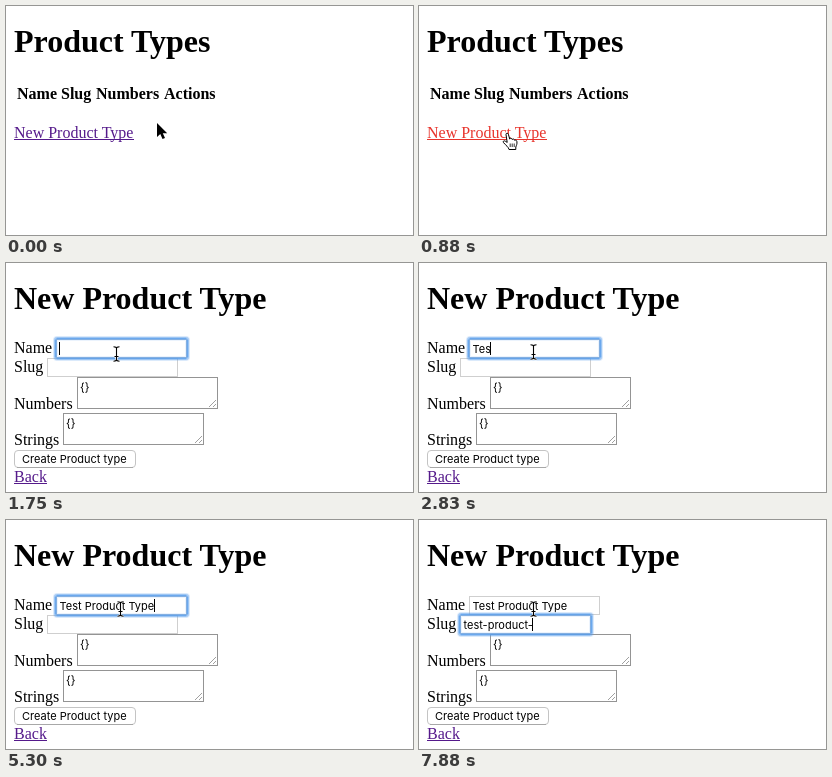
An HTML page for the animation above (8000 ms loop, 407 by 229 pixels).

```html
<!DOCTYPE html>
<html lang="en">
<head>
<meta charset="utf-8">
<title>New Product Type</title>
<style>
  html, body { margin: 0; width: 100%; height: 100%; overflow: hidden; background: #fff; }
  svg { display: block; width: 407px; height: 229px; }
  text { font: 16px "Liberation Serif", "Times New Roman", serif; white-space: pre; }
  .title { font-size: 32px; font-weight: 700; }
  .head { font-weight: 700; }
  .ui { font: 11px Inter, sans-serif; }
  .link { fill: #551a8b; }
  .link.active { fill: #e8342c; }
  .edge { fill: #fff; stroke: #cfcfcf; }
  .area { fill: #fff; stroke: #949494; }
  .ring rect { fill: none; stroke: #5b9fec; }
</style>
</head>
<body>
<svg viewBox="0 0 407 229" xmlns="http://www.w3.org/2000/svg">
  <rect width="407" height="229" fill="#fff"/>

  <g id="listPage">
    <text class="title" x="8" y="46">Product Types</text>
    <text class="head" x="11" y="93">Name</text>
    <text class="head" x="55" y="93">Slug</text>
    <text class="head" x="90" y="93">Numbers</text>
    <text class="head" x="158" y="93">Actions</text>
    <g class="link" id="newLink">
      <text x="8" y="132">New Product Type</text>
      <rect x="8" y="133" width="120" height="1"/>
    </g>
  </g>

  <g id="formPage">
    <text class="title" x="8" y="46">New Product Type</text>
    <text x="8" y="90">Name</text>
    <text x="8" y="109">Slug</text>
    <text x="8" y="146">Numbers</text>
    <text x="8" y="182">Strings</text>
    <rect class="edge" x="50.5" y="76.5" width="130" height="18"/>
    <rect class="edge" x="41.5" y="95.5" width="130" height="18"/>
    <g id="areas"></g>
    <rect x="8.5" y="187.5" width="121" height="17" rx="3.5" fill="#fff" stroke="#c4c4c4"/>
    <path d="M11 204.5H127" stroke="#a8a8a8"/>
    <text class="ui" x="16" y="200">Create Product type</text>
    <g class="link">
      <text x="8" y="219">Back</text>
      <rect x="8" y="220" width="33" height="1"/>
    </g>
    <g class="ring" id="ring"></g>
    <text class="ui" id="nameText" x="53.5" y="90"></text>
    <text class="ui" id="slugText" x="44.5" y="109"></text>
    <rect id="caret" width="1" height="13"/>
  </g>

  <g id="cursor">
    <path id="arrow" d="M0 0V14L3.3 11 5.5 16 8 15 5.8 10.2H10.2Z" stroke="#fff" stroke-width="1.2" paint-order="stroke"/>
    <g id="hand" stroke="#000" stroke-linejoin="round">
      <path fill="#fff" d="M-1 1.5C-1-.2 1-.2 1.4 1.3L2.7 6C3.2 5 5 5 5.2 6.5 6 5.6 7.4 6 7.6 7.3 8.6 6.7 9.8 7.3 9.9 8.6 10.2 11 9.6 12 8.8 14V16.5H2C1.6 14-1 12.6-3.5 9.6-4.4 8.3-3 7.2-1.7 8.2L.2 9.4Z"/>
      <path fill="none" stroke-width=".8" d="M3.2 10.5V14M5.2 10.5V14M7.2 10.5V14"/>
    </g>
    <g id="beam" fill="none">
      <path stroke="#fff" stroke-width="2.4" d="M-3-7.2Q0-7.2 0-5.5V5.5Q0 7.2-3 7.2M3-7.2Q0-7.2 0-5.5V5.5Q0 7.2 3 7.2M-2 2.5H2"/>
      <path stroke="#000" stroke-width="1.1" d="M-3-7.2Q0-7.2 0-5.5V5.5Q0 7.2-3 7.2M3-7.2Q0-7.2 0-5.5V5.5Q0 7.2 3 7.2M-2 2.5H2"/>
    </g>
  </g>
</svg>
<script>
const LOOP = 8000;
const PAGE_AT = 1060, NAME_AT = 1670, SLUG_AT = 5660;
const $ = id => document.getElementById(id);
const show = (id, on) => $(id).setAttribute("display", on ? "inline" : "none");

const name = {
  text: "Test Product Type", x: 53, y: 79, box: [50, 76],
  // [time, characters typed]
  keys: [[2650, 1], [2830, 3], [2910, 4], [3360, 5], [3630, 6], [3720, 7], [3800, 8], [3890, 9],
    [4060, 11], [4240, 12], [4600, 13], [4860, 14], [4950, 15], [5210, 16], [5300, 17]]
};
const slug = {
  text: "test-product-", x: 44, y: 98, box: [41, 95],
  keys: [[6110, 1], [6200, 2], [6290, 3], [6370, 4], [6460, 5], [6730, 6], [6820, 7], [6900, 8],
    [7350, 9], [7440, 10], [7520, 11], [7700, 12], [7880, 13]]
};

const pen = document.createElement("canvas").getContext("2d");
pen.font = "11px Inter, sans-serif";

$("areas").innerHTML = [[71, 114], [57, 150]].map(([x, y]) => `
  <rect class="area" x="${x + .5}" y="${y + .5}" width="140" height="31"/>
  <text class="ui" x="${x + 3}" y="${y + 14}">{}</text>
  <path d="M${x + 132} ${y + 30}l7-7M${x + 136} ${y + 30}l3-3" stroke="#888" stroke-width=".8"/>`).join("");

// Soft focus glow, faintest on the outside
$("ring").innerHTML = [[2.5, .22], [1.5, .6], [.5, .9], [-.5, .65], [-1.5, .12]].map(([d, alpha]) =>
  `<rect x="${-d}" y="${-d}" width="${131 + 2 * d}" height="${19 + 2 * d}" rx="${Math.max(0, d + .5)}" opacity="${alpha}"/>`).join("");

const typed = (field, t) => {
  const key = field.keys.filter(([time]) => time <= t).pop();
  return field.text.slice(0, key ? key[1] : 0);
};

function glide(t, start, steps, from, to) {
  const step = Math.floor((t - start + 4) / 88.3) + 1;
  const p = Math.min(1, Math.max(0, step / steps));
  const eased = p * p * (3 - 2 * p);
  return from.map((v, i) => Math.round(v + (to[i] - v) * eased));
}

function pointer(t) {
  if (t < PAGE_AT) return glide(t, 90, 7, [151, 117], [88, 127]);
  if (t >= 1930) return [114.5, 89];
  if (t >= 1836) return [110.5, 92];
  const [x, y] = glide(t, PAGE_AT, 8, [88, 130], [110, 91]);
  return [x + .5, y];
}

function render(t) {
  const onForm = t >= PAGE_AT;
  show("listPage", !onForm);
  show("formPage", onForm);
  $("newLink").classList.toggle("active", t >= 880);

  const [x, y] = pointer(t);
  const overLink = !onForm && x < 128 && y > 118;
  $("cursor").setAttribute("transform", `translate(${x} ${y})`);
  show("arrow", !onForm && !overLink);
  show("hand", overLink);
  show("beam", onForm);

  $("nameText").textContent = typed(name, t);
  $("slugText").textContent = typed(slug, t);

  const focused = t >= NAME_AT;
  const field = t >= SLUG_AT ? slug : name;
  show("ring", focused);
  show("caret", focused && !(t >= 2200 && t < 2650));
  $("ring").setAttribute("transform", `translate(${field.box})`);
  $("caret").setAttribute("x", Math.round(field.x + pen.measureText(typed(field, t)).width));
  $("caret").setAttribute("y", field.y);
}

const began = performance.now();
function tick() {
  render((performance.now() - began) % LOOP);
  requestAnimationFrame(tick);
}
render(0);
requestAnimationFrame(tick);
</script>
</body>
</html>
```
